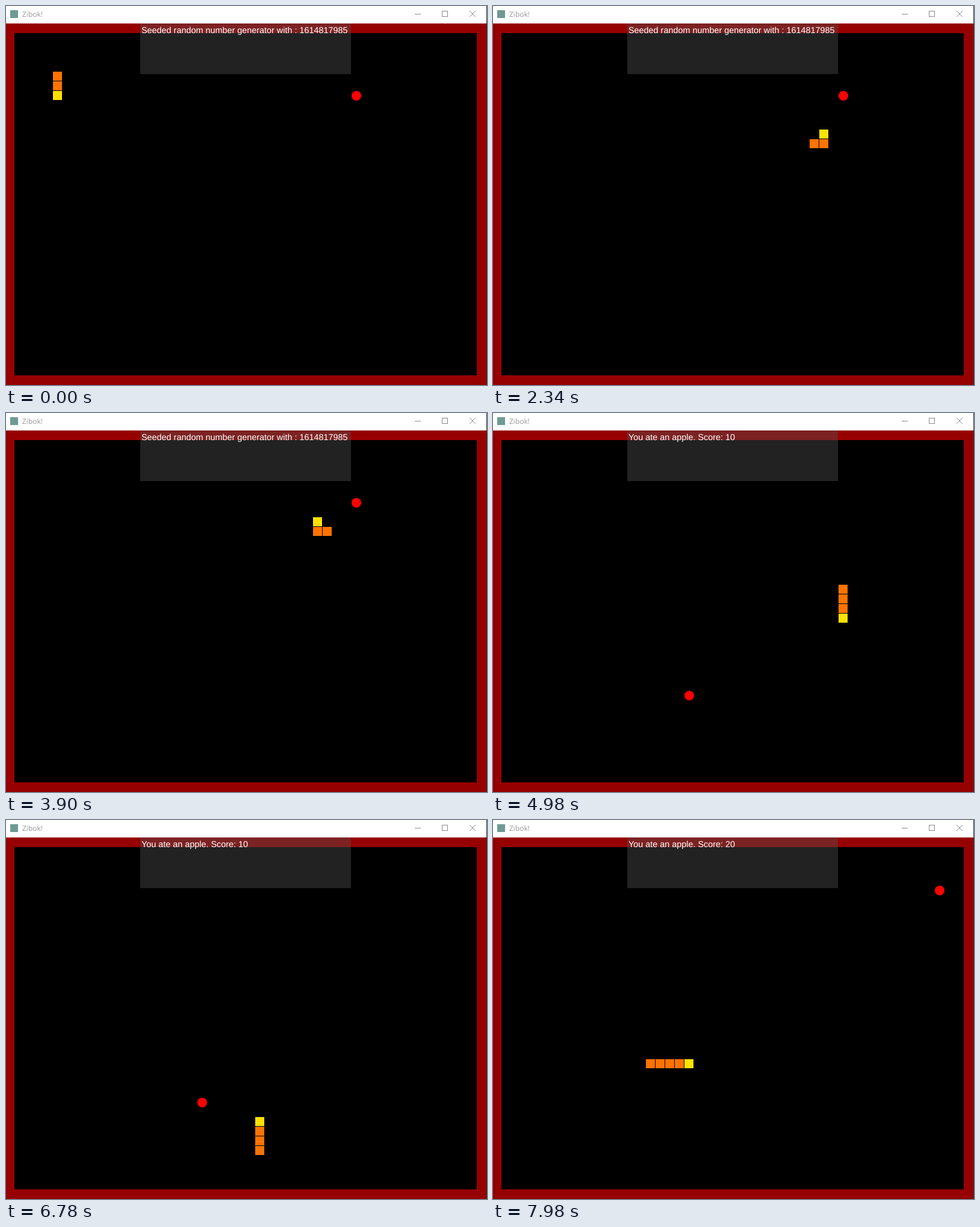
An HTML page that plays this animation: 799x629 px, repeating every 8000 ms.

```html
<!DOCTYPE html>
<html lang="en">
<head>
<meta charset="utf-8">
<title>Zibok!</title>
<style>
  html, body { margin: 0; width: 100%; height: 100%; overflow: hidden; background: #960000; }
  svg { display: block; width: 799px; height: 629px; }
  text { text-rendering: geometricPrecision; }
  .title { font: 12px "Open Sans", "Noto Sans", sans-serif; fill: #999; }
  .log { font: 14.4px "Liberation Sans", Arial, sans-serif; fill: #fff; }
  .buttons { fill: none; stroke: #8a8a8a; }
  .body { fill: #ff7300; }
  .head { fill: #ffe100; }
</style>
</head>
<body>
<svg viewBox="0 0 799 629">
  <rect width="799" height="629" fill="#960000"/>
  <rect x="14" y="45" width="768" height="568"/>

  <rect width="799" height="29" fill="#fff"/>
  <rect x="7" y="7" width="13" height="13" fill="#6f9a94"/>
  <text class="title" x="27" y="18">Zibok!</text>
  <g class="buttons">
    <path d="M679 13.5h10"/>
    <rect x="724.5" y="8.5" width="9" height="9"/>
    <path d="M770 8l10 10M780 8l-10 10"/>
  </g>
  <rect x="798" width="1" height="629" fill="#2c3032"/>

  <circle id="apple" r="8" fill="#f00"/>
  <g id="snake"></g>

  <rect x="223" y="29" width="350" height="84" fill="rgba(85,85,85,.4)"/>
  <text id="log" class="log" x="225" y="45"></text>
</svg>
<script>
  const LOOP = 8000, STEP = 60, FIRST = 300, CELL = 16, LEFT = 14, TOP = 45;
  const MOVES = { U: [0, -1], D: [0, 1], L: [-1, 0], R: [1, 0] };
  const ROUTE = 'D5 R29 U9 R4 D7 L6 U3 R4 D27 L10 U7 L10 U4 R4';
  const APPLES = [[35, 6], [19, 26], [45, 4]];
  const START_LENGTH = 3;

  // Every cell the head visits, led by the starting body.
  const path = [[4, 4], [4, 5], [4, 6]];
  for (const run of ROUTE.split(' ')) {
    const [dx, dy] = MOVES[run[0]];
    for (let i = 0; i < +run.slice(1); i++) {
      const [x, y] = path[path.length - 1];
      path.push([x + dx, y + dy]);
    }
  }
  const lastStep = path.length - START_LENGTH;

  // Number of apples eaten after each step.
  const eaten = [];
  for (let step = 0, count = 0; step <= lastStep; step++) {
    const [x, y] = path[step + START_LENGTH - 1];
    const [ax, ay] = APPLES[count];
    if (x === ax && y === ay) count++;
    eaten.push(count);
  }

  const snake = document.getElementById('snake');
  const apple = document.getElementById('apple');
  const log = document.getElementById('log');
  const maxLength = START_LENGTH + eaten[lastStep];
  const parts = Array.from({ length: maxLength }, (_, i) => {
    const part = document.createElementNS('http://www.w3.org/2000/svg', 'rect');
    part.setAttribute('width', CELL - 1);
    part.setAttribute('height', CELL - 1);
    part.setAttribute('class', i ? 'body' : 'head');
    return snake.appendChild(part);
  });

  function draw(step) {
    const count = eaten[step];
    const length = START_LENGTH + count;
    parts.forEach((part, i) => {
      part.style.display = i < length ? '' : 'none';
      if (i >= length) return;
      const [x, y] = path[step + START_LENGTH - 1 - i];
      part.setAttribute('x', LEFT + x * CELL);
      part.setAttribute('y', TOP + y * CELL);
    });
    const [ax, ay] = APPLES[count];
    apple.setAttribute('cx', LEFT + ax * CELL + CELL / 2);
    apple.setAttribute('cy', TOP + ay * CELL + CELL / 2);
    log.textContent = count
      ? `You ate an apple. Score: ${count * 10}`
      : 'Seeded random number generator with : 1614817985';
  }

  let shown = -1;
  function tick() {
    const t = performance.now() % LOOP;
    const step = Math.min(lastStep, Math.max(0, Math.floor((t - FIRST) / STEP) + 1));
    if (step !== shown) draw(shown = step);
    requestAnimationFrame(tick);
  }
  tick();
</script>
</body>
</html>
```
